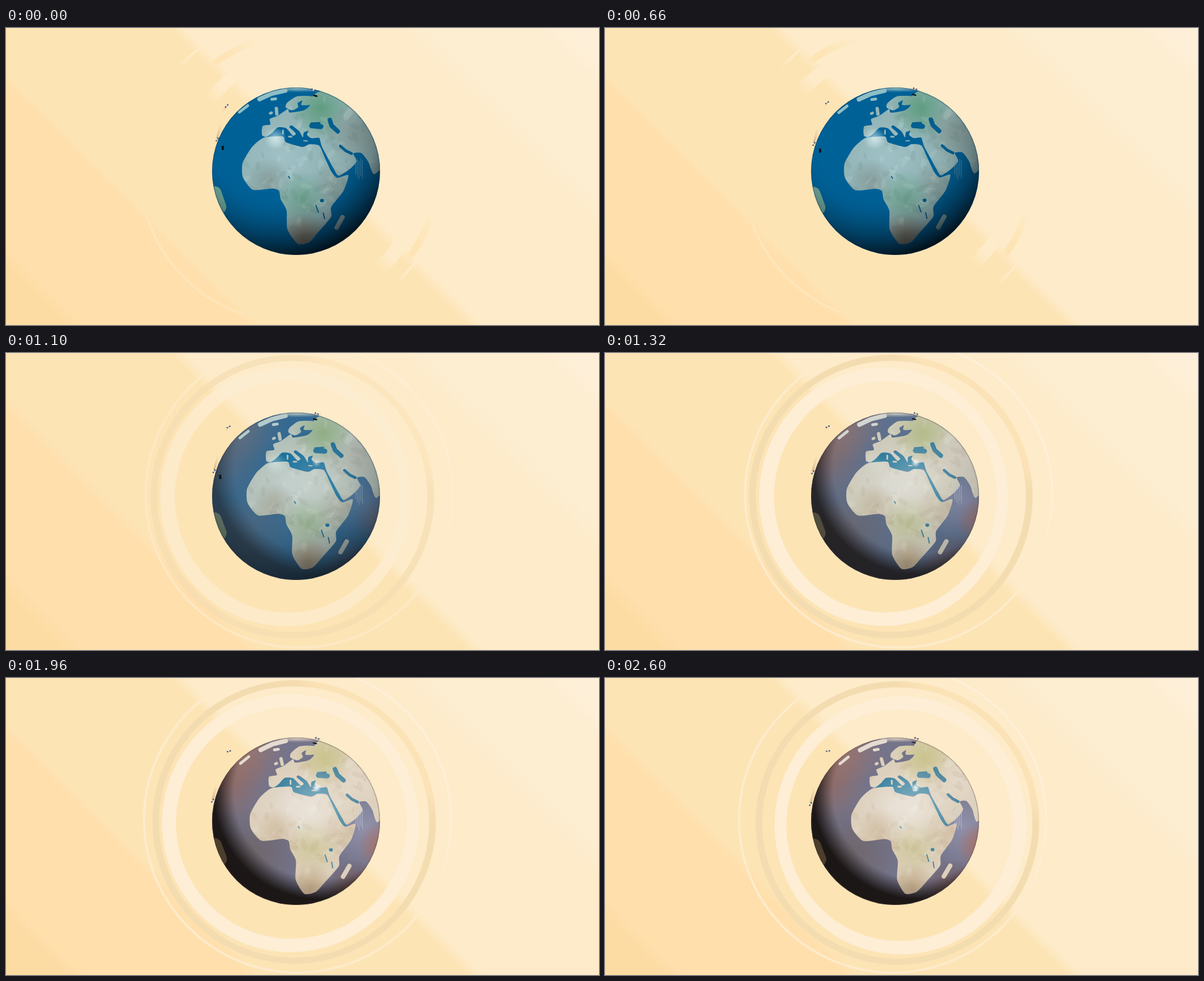
An HTML page with a canvas for the animation above (2.82 s loop, 1056 by 530 pixels).

```html
<!DOCTYPE html>
<html lang="en">
<head>
<meta charset="utf-8">
<title>Globe</title>
<style>
html, body { margin: 0; width: 100%; height: 100%; overflow: hidden; background: #fde4b5; }
canvas { display: block; width: 1056px; height: 530px; }
</style>
</head>
<body>
<canvas id="stage" width="1056" height="530"></canvas>
<script>
const g = document.getElementById('stage').getContext('2d');
const CX = 516.5, CY = 255.5, R = 149.5, TILT = 0.2, SPIN = 0.0117, TAU = Math.PI * 2;
const LOOP = 2820;
const STEPS = [30, 250, 470, 660, 880, 1100, 1320, 1540, 1760, 1960, 2160, 2380, 2600];

// Key points of the coasts on the disc at zero spin, joined by smooth curves
const africa = [
  472,196, 504,194, 510,204, 540,212, 552,207, 569,209, 580,231, 592,256, 602,266, 620,261,
  612,289, 591,318, 590,336, 566,364, 549,382, 529,385, 513,360, 513,326, 503,306, 500,291,
  488,287, 452,290, 433,268, 432,243, 447,216, 460,203];
const eurasia = [
  466,192, 466,176, 480,173, 478,163, 492,157, 509,145, 513,151, 537,147, 547,138, 549,121,
  566,112, 650,140, 690,215, 661,258, 651,236, 640,221, 627,222, 633,236, 622,250, 604,262,
  595,249, 584,229, 574,211, 571,202, 568,195, 555,196, 547,190, 549,183, 541,186, 540,195,
  533,184, 519,174, 515,177, 527,188, 522,192, 509,179, 494,178, 484,188, 474,195];
const nordic = [
  505,142, 506,134, 522,122, 549,122, 548,136, 532,137, 533,129, 525,134, 527,141, 517,147];

let seed = 7;
const rnd = () => (seed = (seed * 16807) % 2147483647) / 2147483647;
const blotches = Array.from({ length: 150 }, () => ({
  x: 432 + rnd() * 225, y: 125 + rnd() * 255, r: 3 + rnd() * 11,
  tone: rnd(), turn: rnd() * 3
}));

const mix = (a, b, k) => a.map((v, j) => v + (b[j] - v) * k);
const rgba = (c, a = 1) => `rgba(${c.map(Math.round)},${a})`;

// Turns a point of the disc about the tilted polar axis
function turn(x, y, w) {
  const u = (x - CX) / R, v = (y - CY) / R;
  const z = Math.sqrt(Math.max(0, 1 - u * u - v * v));
  const c = Math.cos(TILT), s = Math.sin(TILT);
  const v1 = v * c - z * s, z1 = z * c + v * s;
  const u2 = u * Math.cos(w) + z1 * Math.sin(w);
  const z2 = z1 * Math.cos(w) - u * Math.sin(w);
  return [CX + u2 * R, CY + (v1 * c + z2 * s) * R];
}

function pairs(list, w) {
  const out = [];
  for (let j = 0; j < list.length; j += 2) out.push(turn(list[j], list[j + 1], w));
  return out;
}

// Closed curve through all points; the tension keeps capes fairly sharp
function coast(list, w) {
  const p = pairs(list, w), n = p.length, k = 0.11;
  const path = new Path2D();
  path.moveTo(...p[0]);
  for (let j = 0; j < n; j++) {
    const [a, b, c, d] = [j + n - 1, j, j + 1, j + 2].map(q => p[q % n]);
    path.bezierCurveTo(b[0] + (c[0] - a[0]) * k, b[1] + (c[1] - a[1]) * k,
                       c[0] - (d[0] - b[0]) * k, c[1] - (d[1] - b[1]) * k, ...c);
  }
  path.closePath();
  return path;
}

function streak(w, color, width, ...pts) {
  g.strokeStyle = color;
  g.lineWidth = width;
  g.lineCap = g.lineJoin = 'round';
  g.beginPath();
  for (const q of pairs(pts, w)) g.lineTo(...q);
  g.stroke();
}

function glow(x, y, r, c, a) {
  const f = g.createRadialGradient(x, y, 0, x, y, r);
  f.addColorStop(0, rgba(c, a));
  f.addColorStop(0.45, rgba(c, a * 0.6));
  f.addColorStop(1, rgba(c, 0));
  g.fillStyle = f;
  g.fillRect(x - r, y - r, 2 * r, 2 * r);
}

// Darkness that grows from distance r0 to r1
function shade(x, y, r0, r1, c, power) {
  const f = g.createRadialGradient(x, y, r0, x, y, r1);
  for (let s = 0; s <= 1; s += 0.125) f.addColorStop(s, rgba(c, 0.97 * Math.pow(s, power)));
  g.fillStyle = f;
  g.fillRect(360, 100, 320, 310);
}

// Gradient across the stage along x - y
function diagonal(stops) {
  const f = g.createLinearGradient(0, 530, 793, -263);
  for (const [d, c] of stops) f.addColorStop((d + 530) / 1586, c);
  return f;
}

// Flat colours with soft edges at the given places
function zones(first, ...edges) {
  const stops = [[-530, first]];
  for (const [d, soft, c] of edges) stops.push([d - soft, stops.at(-1)[1]], [d + soft, c]);
  return diagonal(stops);
}

const clear = 'rgba(253,235,201,0)', cream = '#fdebc9', sand = '#fee4b5';
const backdrop = zones('#fddca4', [-405, 20, '#ffdfac'], [-90, 14, '#fde4b5'],
  [305, 14, cream], [720, 30, '#fdedd1'], [970, 25, '#fef0d8']);
const faintA = zones(clear, [255, 20, cream], [325, 10, clear]);
const faintB = zones('rgba(254,228,181,0)', [308, 8, sand], [385, 40, 'rgba(254,228,181,0)']);
const faintC = zones('#fee6ba', [-90, 12, clear], [255, 20, cream], [325, 10, clear]);
const duskB = zones('#f4dcb1', [530, 22, '#fce3b7']);
const paleC = zones('#fdebcc', [500, 200, '#fef0d9']);

function band(x, y, rx, ry, wx, wy, fill, shift = 0) {
  g.fillStyle = fill;
  g.beginPath();
  g.ellipse(x, y, rx, ry, 0, 0, TAU);
  g.moveTo(x + shift + rx - wx, y);
  g.ellipse(x + shift, y, rx - wx, ry - wy, 0, 0, TAU);
  g.fill('evenodd');
}

function rings(i) {
  const c = Math.cos(i * TAU / 14.5);
  const k = i < 6 ? 0 : i === 6 ? 0.65 : 1;
  const draw = (alpha, a, b, thin) => {
    g.globalAlpha = alpha;
    band(517 - 6 * c, 252.7, 275.5, 275, 4, 4, thin);
    band(515.5 + 6.5 * c, 257.5 + 1.5 * c, 252.5, 253, 12, 11, b);
    band(513 + 17 * c, 260 + 3.5 * c, 230 - 8.5 * c * c, 230.5, 23.5, 24, a, -3 * c);
    g.globalAlpha = 1;
  };
  if (k < 1) draw(1 - k, faintA, faintB, faintC);
  if (k) draw(k, '#fdeed5', duskB, paleC);
}

function globe(i, m) {
  const w = (i - 8) * SPIN;
  const tone = (a, b, alpha) => rgba(mix(a, b, m), alpha);
  const late = (alpha, paint) => {
    g.globalAlpha = m * alpha;
    paint();
    g.globalAlpha = 1;
  };
  const dusk = () => shade(560, 205, 153, 190, [26, 21, 20], 1.2);

  g.save();
  g.beginPath();
  g.arc(CX, CY, R, 0, TAU);
  g.clip();

  // Ocean
  g.fillStyle = tone([0, 97, 151], [116, 116, 139]);
  g.fillRect(360, 100, 320, 310);
  late(1, () => {
    glow(384, 180, 85, [158, 104, 86], 0.75);
    glow(425, 122, 75, [164, 116, 100], 0.75);
    glow(440, 310, 85, [110, 98, 98], 0.75);
    glow(640, 265, 75, [148, 148, 174], 0.9);
    glow(672, 300, 45, [178, 104, 84], 0.8);
    glow(625, 390, 65, [120, 72, 62], 0.8);
    dusk();
  });
  const sea = tone([0, 97, 151], [62, 132, 160]);
  streak(w, sea, 32, 490,191, 558,195);
  streak(w, sea, 7, 572,211, 586,238, 600,262);

  // Land
  const soil = tone([146, 180, 182], [220, 207, 187]);
  const lands = [africa, eurasia, nordic].map(p => coast(p, w));
  const clip = new Path2D();
  g.fillStyle = soil;
  for (const p of lands) {
    g.fill(p);
    clip.addPath(p);
  }
  streak(w, soil, 6, 488,144, 490,154);
  streak(w, soil, 5, 478,153, 480,152);
  streak(w, soil, 8, 609,336, 598,355);
  streak(w, soil, 3, 504,183, 504,189);
  streak(w, soil, 3, 515,194, 520,194);
  streak(w, soil, 2, 542,201, 548,201);
  streak(w, tone([110, 165, 152], [92, 74, 52]), 26, 371,298, 380,322);

  g.save();
  g.clip(clip);
  const spot = (x, y, r, a, b, alpha) => glow(...turn(x, y, w), r, mix(a, b, m), alpha);
  const green = [90, 154, 122], olive = [200, 194, 136];
  const rock = [128, 146, 142], tan = [204, 182, 152];
  spot(505, 230, 75, [163, 197, 203], [229, 220, 208], 0.8);
  spot(566, 143, 55, green, olive, 0.9);
  spot(540, 303, 50, green, olive, 0.6);
  spot(480, 272, 40, rock, tan, 0.7);
  spot(595, 275, 40, rock, tan, 0.6);
  spot(625, 185, 55, rock, [230, 218, 204], 0.8);
  spot(540, 372, 42, [128, 112, 92], [188, 162, 126], 0.8);
  for (const b of blotches) {
    g.fillStyle = b.tone < 0.5 ? tone([70, 105, 100], [165, 138, 100], 0.1)
                               : 'rgba(240,246,244,0.09)';
    g.beginPath();
    g.ellipse(...turn(b.x, b.y, w), b.r, b.r * 0.45, b.turn, 0, TAU);
    g.fill();
  }
  g.restore();

  // Ice
  const ice = tone([142, 190, 198], [228, 219, 210]);
  streak(w, ice, 8, 453,128, 474,118, 498,112);
  streak(w, ice, 5, 477,128, 484,127);
  streak(w, ice, 5, 417,152, 432,140);

  // Inland water
  const lake = tone([4, 94, 142], [80, 136, 160]);
  streak(w, lake, 9, 554,174, 570,175);
  streak(w, lake, 4, 553,170, 567,169);
  streak(w, lake, 8, 584,163, 588,173, 599,183);
  streak(w, lake, 5, 605,209, 614,217, 624,222);
  streak(w, lake, 6, 575,307, 576,307);
  streak(w, lake, 2, 565,316, 569,328);
  streak(w, lake, 2, 577,329, 579,339);
  streak(w, lake, 2, 517,265, 519,268);

  // Polar haze
  g.save();
  g.translate(520, 107);
  g.scale(1, 0.12);
  glow(0, 0, 65, mix([150, 190, 196], [222, 210, 196], m), 1);
  g.restore();

  // Light streaks over the eastern sea
  g.fillStyle = tone([130, 160, 180], [205, 212, 222], 0.5);
  for (let j = 0; j < 5; j++) g.fillRect(622 + j * 3, 231 + j * 3 % 7, 1.3, 30 + j * 2 % 5);

  // Light and shade
  if (m < 1) {
    g.globalAlpha = 1 - m;
    shade(480, 180, 110, 238, [3, 5, 9], 2);
    glow(480, 197, 20, [235, 250, 250], 0.65);
    g.globalAlpha = 1;
  }
  late(0.25, dusk);
  late(1, () => {
    glow(552, 230, 75, [250, 249, 248], 0.4);
    glow(553, 196, 8, [255, 255, 255], 0.95);
  });
  g.lineWidth = 3;
  g.strokeStyle = tone([10, 40, 60], [90, 62, 52], 0.3);
  g.beginPath();
  g.arc(CX, CY, R, 0, TAU);
  g.stroke();
  g.restore();
}

function craft(x, y, a) {
  g.save();
  g.translate(x, y);
  g.rotate(a);
  g.fillStyle = '#2b3444';
  g.fillRect(-3.6, -1.5, 2, 2.4);
  g.fillRect(1.6, -1, 2, 2.4);
  g.fillStyle = '#f4f1ee';
  g.fillRect(-1.6, -1.5, 3.2, 3);
  g.fillStyle = '#4a5c8c';
  g.fillRect(-0.6, -0.4, 1.6, 1.4);
  g.restore();
}

function beam(x, y, dx, dy, width, a) {
  const f = g.createLinearGradient(x, y, x + dx, y + dy);
  f.addColorStop(0, `rgba(176,140,112,${a})`);
  f.addColorStop(1, 'rgba(190,160,125,0)');
  g.strokeStyle = f;
  g.lineWidth = width;
  g.lineCap = 'butt';
  g.beginPath();
  g.moveTo(x, y);
  g.lineTo(x + dx, y + dy);
  g.stroke();
}

function mark(x, y, a, b, rot) {
  g.fillStyle = '#0b0f14';
  g.beginPath();
  g.ellipse(x, y, a, b, rot, 0, TAU);
  g.fill();
}

function crafts(i) {
  const ease = 1 - Math.exp(-i / 4);
  const ax = 393 + 4.3 * ease, ay = 139 - 9 * ease;
  const bx = 376 - 10 * Math.pow(i / 13, 0.8), by = 199 + 2 * i;
  const cx = 547.5 + 7.5 * ease, cy = 110.5 - 3 * ease;
  beam(ax, ay, -8, 11, 2.5, 0.5 * Math.exp(-i / 5));
  craft(ax, ay, -0.9 + i * 0.05);
  beam(bx, by - 2, 7, -27, 4, 0.5);
  craft(bx, by, -1.1);
  beam(cx - 5, cy, 13, 2, 2.5, 0.5);
  craft(cx, cy, 0.3);
  mark(551 - i * 0.1, 121 - 0.45 * i, 4.2, 1.6 - 0.06 * i, 0.27);
  if (i < 7) {
    const x = 386 - 0.75 * i, y = 214 + 1.2 * i;
    mark(x, y, 1.4, 4.5, 0.25);
    mark(x, y, 1.2, 4, -0.6);
  }
}

function draw(t) {
  const i = STEPS.filter(s => s <= t).length;
  const m = i < 6 ? 0 : Math.min(1, 0.45 + (i - 6) * 0.35);
  g.fillStyle = backdrop;
  g.fillRect(0, 0, 1056, 530);
  rings(i);
  globe(i, m);
  crafts(i);
}

const start = performance.now();
function tick() {
  draw((performance.now() - start) % LOOP);
  requestAnimationFrame(tick);
}
tick();
</script>
</body>
</html>
```
